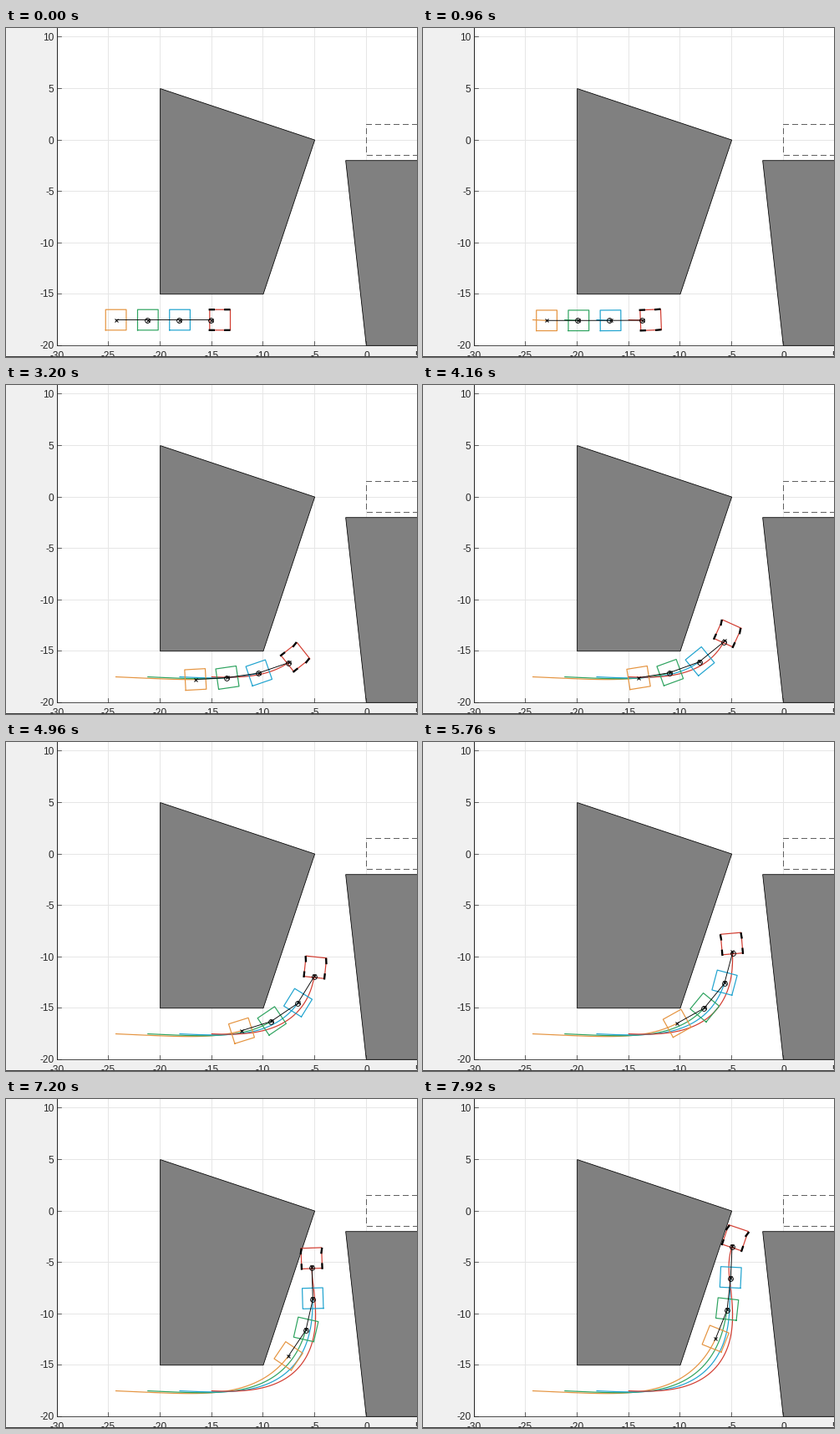
Animation, 492 px wide and 394 px high, one loop 8 s. Source, as a matplotlib script:

```python
import numpy as np
import matplotlib.pyplot as plt
from matplotlib.animation import FuncAnimation
from matplotlib.patches import Polygon, Rectangle

W, H, DPI = 492, 394, 64
PX = 72 / DPI                      # one pixel in points
FRAMES, INTERVAL, SUBSTEPS = 100, 80, 10
COLORS = ["#d23c30", "#1fa3cf", "#2ea35f", "#e59440"]
INK, GRID = "#262626", "#e6e6e6"
HITCH, DRAWBAR, WHEELBASE = 0.1, 3.0, 1.5
SPEED, RAMP = 0.23, 12.4           # units per frame, frames of acceleration
SIDESLIP = np.radians(2.6)

plt.rcParams["path.snap"] = False


def to_px(points):
    return np.asarray(points, float) * [12.333, -12.31] + [431.3, 134.1]


def crisp(value):
    return np.floor(value) + 0.5


def travelled(n):
    return SPEED * np.where(n < RAMP, n * n / (2 * RAMP), n - RAMP / 2)


def tractor_heading(s):
    """A smooth left turn, then a growing swing back to the right."""
    def left(u):
        return 109 / (1 + np.exp(-0.37 * (u - 9.02)))
    return np.radians(left(s) - left(0) - 1.4 * np.maximum(s - 16.5, 0) ** 2)


def simulate():
    """Drive the tractor and let each trailer follow the unit ahead of it."""
    s = travelled(np.arange((FRAMES - 1) * SUBSTEPS + 1) / SUBSTEPS)
    heading = np.zeros((len(s), 4))
    heading[:, 0] = tractor_heading(s)
    for i, step in enumerate(np.diff(s)):
        for k in range(1, 4):
            bend = heading[i, k - 1] - heading[i, k]
            turn = heading[i + 1, k - 1] - heading[i, k - 1]
            swing = step * np.sin(bend) - HITCH * turn * np.cos(bend)
            heading[i + 1, k] = heading[i, k] + swing / DRAWBAR
            step = step * np.cos(bend) + HITCH * turn * np.sin(bend)

    course = heading[:-1, 0] - SIDESLIP
    moves = np.diff(s)[:, None] * np.stack([np.cos(course), np.sin(course)], axis=1)
    start = np.array([[-15, -17.5]])
    position = np.vstack([start, start + np.cumsum(moves, axis=0)])
    steer = np.arctan(WHEELBASE * np.gradient(heading[:, 0])
                      / np.maximum(np.gradient(s), 1e-3))
    return position[::SUBSTEPS], heading[::SUBSTEPS], steer[::SUBSTEPS]


position, heading, steer = simulate()
direction = np.stack([np.cos(heading), np.sin(heading)], axis=-1)
axles, hitches = [position], []
for k in range(1, 4):
    hitches.append(axles[-1] - HITCH * direction[:, k - 1])
    axles.append(hitches[-1] - DRAWBAR * direction[:, k])


def place(local, origin, angle):
    c, s = np.cos(angle), np.sin(angle)
    return np.asarray(local, float) @ np.array([[c, s], [-s, c]]) + origin


def box(back, front):
    return [(back, -1), (front, -1), (front, 1), (back, 1), (back, -1)]


fig = plt.figure(figsize=(W / DPI, H / DPI), dpi=DPI, facecolor="#f0f0f0")
ax = fig.add_axes([0, 0, 1, 1])
ax.set(xlim=(0, W), ylim=(H, 0))
ax.axis("off")


def stroke(points, color="black", width=1, **kw):
    x, y = np.asarray(points, float).T
    return ax.plot(x, y, color=color, lw=width * PX, **kw)[0]


# Plot area, axes, grid and labels
LEFT, BOTTOM = 61.5, 380.5
ax.add_patch(Rectangle((LEFT, -5), W, BOTTOM + 5, fc="white", ec="none", zorder=0))
font = dict(family="Liberation Sans", size=11.9 * PX, color=INK, va="baseline")
for v in range(-30, 6, 5):
    x = crisp(to_px((v, 0))[0])
    stroke([(x, 0), (x, BOTTOM)], GRID, zorder=0.5)
    stroke([(x, BOTTOM), (x, BOTTOM - 5)], INK, 0.7, zorder=2)
    ax.text(x, 395.5, str(v), ha="center", **font)
for v in range(-20, 11, 5):
    y = crisp(to_px((0, v))[1])
    stroke([(LEFT, y), (W, y)], GRID, zorder=0.5)
    stroke([(LEFT, y), (LEFT + 5, y)], INK, 0.7, zorder=2)
    ax.text(57.5, y + 4, str(v), ha="right", **font)
stroke([(LEFT, -2), (LEFT, BOTTOM)], INK, zorder=2)
stroke([(LEFT, BOTTOM), (W + 2, BOTTOM)], INK, 0.8, zorder=2)
stroke([(-2, 393.5), (W + 2, 393.5)], "#404040", zorder=9)

# Obstacles and goal
for shape in ([(-20, 5), (-5, 0), (-10, -15), (-20, -15)],
              [(-2, -2), (8, -2), (8, -20), (0, -20)]):
    ax.add_patch(Polygon(to_px(shape), fc="#808080", ec="black", lw=0.8 * PX, zorder=1))
stroke(crisp(to_px([(8, 1.5), (0, 1.5), (0, -1.5), (8, -1.5)])), "#606060",
       dashes=(7, 4), zorder=1.2)

# Moving parts
NOWHERE = [(-50, -50)]
trails = [stroke(NOWHERE, c, 1.2, zorder=3.4 - 0.1 * k) for k, c in enumerate(COLORS)]
bodies = [stroke(NOWHERE, c, 1.2, zorder=4) for c in COLORS]
wheels = [stroke(NOWHERE, width=2.3, solid_capstyle="butt", zorder=6) for _ in range(4)]
chain = stroke(NOWHERE, width=0.9, zorder=5)
crosses = stroke(NOWHERE, ls="none", marker="x", ms=4.4 * PX, mew=PX, zorder=5)
rings = stroke(NOWHERE, ls="none", marker="o", mfc="none", ms=5.8 * PX,
               mew=0.9 * PX, zorder=5)
MOUNTS = [(0, -1), (0, 1), (WHEELBASE, -1), (WHEELBASE, 1)]


def put(line, points):
    line.set_data(*to_px(points).T)


def update(n):
    for k in range(4):
        put(trails[k], axles[k][:n + 1])
        outline = box(-0.2, 1.8) if k == 0 else box(-1, 1)
        put(bodies[k], place(outline, axles[k][n], heading[n, k]))

    for line, mount in zip(wheels, MOUNTS):
        tyre = place([(-0.3, 0), (0.3, 0)], mount, steer[n] if mount[0] else 0)
        put(line, place(tyre, axles[0][n], heading[n, 0]))

    joints = [axles[0][n]]
    for k in range(3):
        joints += [hitches[k][n], axles[k + 1][n]]
    put(chain, joints)
    put(crosses, joints[::2])
    put(rings, joints[1::2])
    return trails + bodies + wheels + [chain, crosses, rings]


anim = FuncAnimation(fig, update, frames=FRAMES, interval=INTERVAL,
                     repeat=True, repeat_delay=0, blit=False)
plt.show()
```
